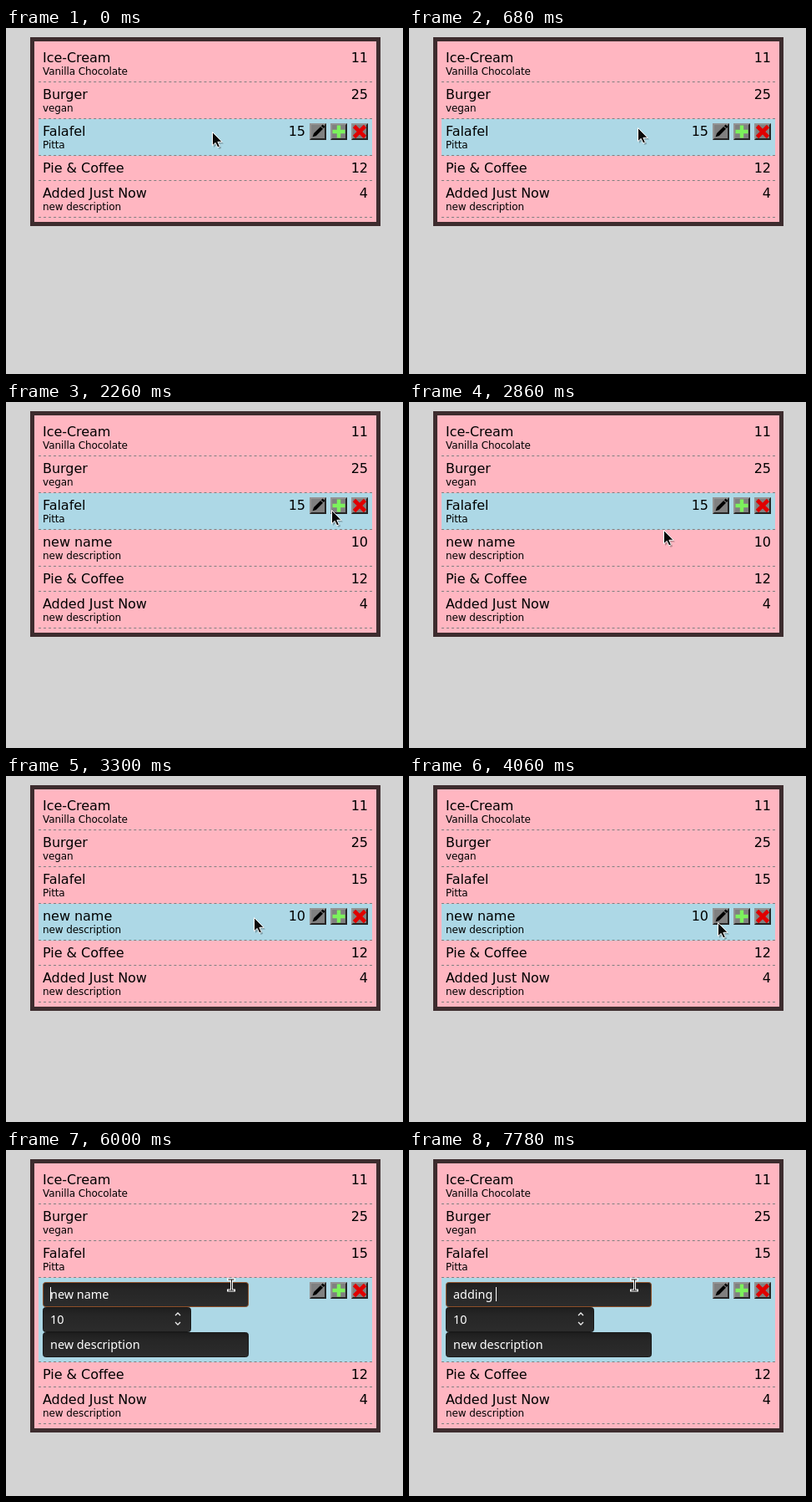
Write an HTML page that moves like this. It is 476x414 px and loops after 8 s.

```html
<!DOCTYPE html>
<html lang="en">
<head>
<meta charset="utf-8">
<title>Shopping list</title>
<style>
html, body { margin: 0; width: 100%; height: 100%; overflow: hidden; background: #d3d3d3; }
svg { display: block; }
text { white-space: pre; }
.name { font: 16px "DejaVu Sans", sans-serif; letter-spacing: -.04px; }
.desc { font: 12px "DejaVu Sans", sans-serif; letter-spacing: -.09px; }
.field { font: 14.4px "Noto Sans", sans-serif; fill: #fff; }
.end { text-anchor: end; }
</style>
</head>
<body>
<svg width="476" height="414" viewBox="0 0 476 414">
  <defs>
    <linearGradient id="dark" x1="0" y1="0" x2="0" y2="1">
      <stop offset="0" stop-color="#1e1e1e"/>
      <stop offset=".3" stop-color="#262626"/>
      <stop offset="1" stop-color="#2c2c2c"/>
    </linearGradient>
    <path id="ibeam" d="M-3.5-6H3.5M-3.5 7H3.5M.5-6V7"/>
  </defs>
  <g id="list"></g>
  <g id="arrow">
    <path d="M1 2.5V19l4-3.5 2.6 5.5 2.6-1.2-2.5-5.3h5.3z" opacity=".25"/>
    <path d="M-.5 .5V16.7L3.2 13.4 5.8 18.9 8.4 17.7 5.9 12.3H11.1Z" fill="#0a0a0a" stroke="#fff"/>
  </g>
  <g id="beam">
    <use href="#ibeam" stroke="#fff" stroke-width="3" stroke-linecap="square"/>
    <use href="#ibeam" stroke="#111"/>
  </g>
</svg>
<script>
const LOOP = 8000, DASH = 400 / 133;
const $ = id => document.getElementById(id);
const pen = document.createElement('canvas').getContext('2d');
pen.font = '14.4px "Noto Sans", sans-serif';
const widthOf = s => pen.measureText(s).width;

// each move of the pointer eases to x, y, arching upwards by bow
const home = { x: 248, y: 124 };
const moves = [
  { from: 460, to: 1220, x: 387, y: 130, bow: 11 },
  { from: 1280, to: 1500, x: 391, y: 129, bow: 0 },
  { from: 2420, to: 2860, x: 306, y: 153, bow: 0 },
  { from: 2860, to: 3180, x: 298, y: 169, bow: 0 },
  { from: 3260, to: 4060, x: 371, y: 175, bow: 2 },
  { from: 4460, to: 4960, x: 372, y: 173, bow: 0 },
  { from: 5520, to: 6000, x: 270, y: 161, bow: 0 }
];

const typed = 'adding ';
const keyTimes = [6560, 6820, 7020, 7320, 7460, 7540, 7780];

function pointer(t) {
  let { x, y } = home;
  for (const m of moves) {
    if (t < m.from) break;
    const u = Math.min(1, (t - m.from) / (m.to - m.from));
    const e = (1 - Math.cos(Math.PI * u)) / 2;
    x += (m.x - x) * e;
    y += (m.y - y) * e - m.bow * Math.sin(Math.PI * e);
  }
  return [Math.round(x), Math.round(y)];
}

const rect = (x, y, w, h, fill, more = '') =>
  `<rect x="${x}" y="${y}" width="${w}" height="${h}" fill="${fill}" ${more}/>`;
const text = (cls, x, y, s) => `<text class="${cls}" x="${x}" y="${y}">${s}</text>`;

const icons = [
  '<path transform="rotate(45 10 10)" d="M8 3.5h4V15L10 19 8 15ZM8 2.5V0h4V2.5Z"/>',
  '<path d="M10 2.5V17.5M2.5 10H17.5" stroke="#7cf25c" stroke-width="4.4"/>',
  '<path d="M3.5 3.5 16.5 16.5M16.5 3.5 3.5 16.5" stroke="#e00000" stroke-width="4.6"/>'
];

function button(i, y, pressed) {
  const light = '#939393', shade = '#252525';
  const [a, b] = pressed ? [shade, light] : [light, shade];
  const d = pressed ? 1 : 0;
  return `<g transform="translate(${364 + 25 * i} ${y})">` + rect(0, 0, 20, 20, '#808080') +
    `<path d="M0 20V0H20L18 2H2V18Z" fill="${a}"/><path d="M20 0V20H0L2 18H18V2Z" fill="${b}"/>` +
    `<g transform="translate(${d} ${d})">${icons[i]}</g></g>`;
}

const box = (y, w, focus) =>
  rect(44.5, y + .5, w - 1, 29, 'url(#dark)', `rx="3" stroke="${focus ? '#8f5029' : '#191919'}"`);

function form(y, s) {
  let out = box(y, 247, s.focus) + box(y + 30, 178) + box(y + 60, 247);
  if (s.sel) {
    const x = 53 + widthOf(s.value.slice(0, -s.sel.length));
    out += rect(x, y + 6, widthOf(s.sel), 17, '#f07746');
  }
  [s.value, '10', 'new description'].forEach((v, i) => out += text('field', 53, y + 20 + 30 * i, v));
  if (s.caret >= 0) {
    out += rect(Math.round(53 + widthOf(s.value.slice(0, s.caret))), y + 6, 1, 17, '#fff');
  }
  return out + `<path d="M203 ${y + 40}l3-3 3 3M203 ${y + 48}l3 3 3-3" fill="none" stroke="#eee" stroke-width="1.3"/>`;
}

function list(s) {
  const rows = [['Ice-Cream', 11, 'Vanilla Chocolate'], ['Burger', 25, 'vegan'], ['Falafel', 15, 'Pitta'],
    ['Pie &amp; Coffee', 12, ''], ['Added Just Now', 4, 'new description']];
  if (s.added) rows.splice(3, 0, ['new name', 10, 'new description']);
  let y = 21, out = '';
  rows.forEach(([name, price, desc], i) => {
    const hot = i === s.hot, edit = hot && s.edit;
    const h = edit ? 101 : desc ? 44 : 30;
    if (hot) out += rect(39, y, 400, h, '#add8e6');
    if (edit) out += form(y + 5, s);
    else out += text('name', 44, y + 20, name) + text('desc', 44, y + 35, desc) +
      text('name end', hot ? 359 : 434, y + 20, price);
    if (hot) icons.forEach((_, n) => out += button(n, y + 5, n === s.press));
    out += `<path d="M39 ${y + h - .5}H439" stroke="#808080" stroke-dasharray="${DASH}"/>`;
    y += h;
  });
  return rect(31.5, 13.5, 415, y - 6, '#ffb6c1', 'stroke="#3d2c2e" stroke-width="5"') + out;
}

function stateAt(t) {
  const s = {
    added: t >= 2260,
    hot: t >= 2900 ? 3 : 2,
    edit: t >= 5420,
    press: t >= 2160 && t < 2260 ? 1 : t >= 5200 && t < 5420 ? 0 : -1,
    focus: t >= 6000,
    value: 'new name', sel: '', caret: -1
  };
  const n = keyTimes.filter(k => t >= k).length;
  if (n) {
    s.value = typed.slice(0, n);
    s.caret = n;
  } else if (t >= 6280) s.sel = s.value;
  else if (t >= 6160) s.sel = 'name';
  else if (s.focus) s.caret = 0;
  return s;
}

let last = '';
function draw(t) {
  const s = stateAt(t), key = JSON.stringify(s);
  if (key !== last) $('list').innerHTML = list(s);
  last = key;
  const [x, y] = pointer(t), overField = s.edit && x < 291;
  $('arrow').style.display = overField ? 'none' : '';
  $('beam').style.display = overField ? '' : 'none';
  $(overField ? 'beam' : 'arrow').setAttribute('transform', `translate(${x} ${y})`);
}

const start = performance.now();
function tick() {
  draw((performance.now() - start) % LOOP);
  requestAnimationFrame(tick);
}
tick();
</script>
</body>
</html>
```
